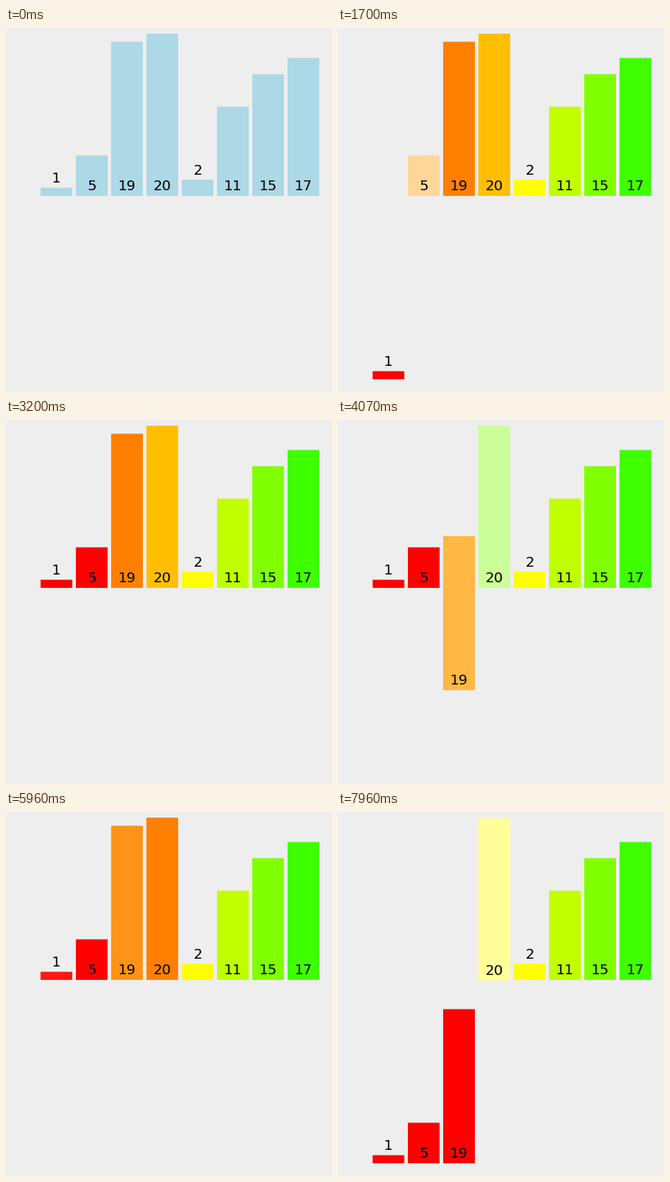
Recreate the animation shown at these times as a matplotlib script. Size 462x516 px, loop 8 s.

```python
import matplotlib.pyplot as plt
from matplotlib.animation import FuncAnimation
from matplotlib.colors import to_rgb
from matplotlib.patches import Rectangle

WIDTH, HEIGHT, DPI = 462, 516, 100
LOOP_MS, INTERVAL = 8000, 20
VALUES = [1, 5, 19, 20, 2, 11, 15, 17]
UNIT, BAR_WIDTH, PITCH, LEFT = 11.5, 45, 50, 49
BASE, DROP = 238, 260
UP, DOWN = 0, 1

RAINBOW = ["#ff0000", "#ff4000", "#ff8000", "#ffbf00",
           "#ffff00", "#bfff00", "#80ff00", "#40ff00"]
PALE = ["#ff9999", "#ffd699", "#ffff99", "#ccff99"]
RED, ORANGE = RAINBOW[0], RAINBOW[2]

# Transition time reached at each visible step, by number of steps
PHASES = {1: (0.1,), 2: (0.6, 1), 3: (0.335, 0.655, 1), 4: (0.16, 0.52, 0.8, 1)}

# start, end, steps, {bar: (row, colour)}
EVENTS = [
    (500, 580, 2, {i: (UP, c) for i, c in enumerate(RAINBOW)}),
    (1080, 1140, 2, {0: (UP, PALE[0]), 1: (UP, PALE[1])}),
    (1470, 1700, 4, {0: (DOWN, RED)}),
    (1930, 2170, 4, {1: (DOWN, RED)}),
    (2410, 2650, 4, {0: (UP, RED)}),
    (2960, 3200, 4, {1: (UP, RED)}),
    (3520, 3600, 2, {2: (UP, PALE[2]), 3: (UP, PALE[3])}),
    (3920, 4150, 4, {2: (DOWN, ORANGE)}),
    (4460, 4710, 4, {3: (DOWN, ORANGE)}),
    (4940, 5190, 4, {2: (UP, ORANGE)}),
    (5490, 5650, 3, {3: (UP, ORANGE)}),
    (5960, 6120, 3, {0: (UP, PALE[0]), 2: (UP, PALE[2])}),
    (6450, 6680, 4, {0: (DOWN, RED), 1: (UP, PALE[0])}),
    (7020, 7160, 3, {1: (DOWN, RED)}),
    (7480, 7720, 4, {2: (DOWN, RED), 3: (UP, PALE[2])}),
    (7960, 7960, 1, {3: (DOWN, RED)}),
]


def ease(t):
    return 4 * t**3 if t < 0.5 else 1 - 4 * (1 - t)**3


def progress(t, start, end, steps):
    gap = (end - start) / max(steps - 1, 1) or 1
    step = min(int((t - start) / gap), steps - 1)
    return ease(PHASES[steps][step])


def state_at(t):
    """Row position followed by RGB for every bar."""
    bars = [(UP, *to_rgb("lightblue")) for _ in VALUES]
    for start, end, steps, changes in EVENTS:
        if t < start:
            break
        p = progress(t, start, end, steps)
        for i, (row, color) in changes.items():
            goal = (row, *to_rgb(color))
            bars[i] = tuple(a + (b - a) * p for a, b in zip(bars[i], goal))
    return bars


fig = plt.figure(figsize=(WIDTH / DPI, HEIGHT / DPI), dpi=DPI, facecolor="#eeeeee")
ax = fig.add_axes([0, 0, 1, 1])
ax.set(xlim=(0, WIDTH), ylim=(HEIGHT, 0))
ax.axis("off")

rects, labels = [], []
for i, value in enumerate(VALUES):
    x = LEFT + PITCH * i
    rect = Rectangle((x, BASE - value * UNIT), BAR_WIDTH, value * UNIT,
                     linewidth=0, snap=False)
    rects.append(ax.add_patch(rect))
    labels.append(ax.text(x + BAR_WIDTH / 2, BASE, str(value), color="black",
                          family="DejaVu Sans", fontsize=20 * 72 / DPI,
                          ha="center", va="baseline"))


def draw(frame):
    t = frame * INTERVAL + INTERVAL / 2
    for value, rect, label, (row, *rgb) in zip(VALUES, rects, labels, state_at(t)):
        bottom = BASE + DROP * row
        top = bottom - value * UNIT
        rect.set_y(top)
        rect.set_facecolor(rgb)
        # Short bars carry their label above
        label.set_y(top - 7.5 if value * UNIT < 30 else bottom - 8)
    return rects + labels


anim = FuncAnimation(fig, draw, frames=LOOP_MS // INTERVAL, interval=INTERVAL,
                     repeat=True, repeat_delay=0)
plt.show()
```
